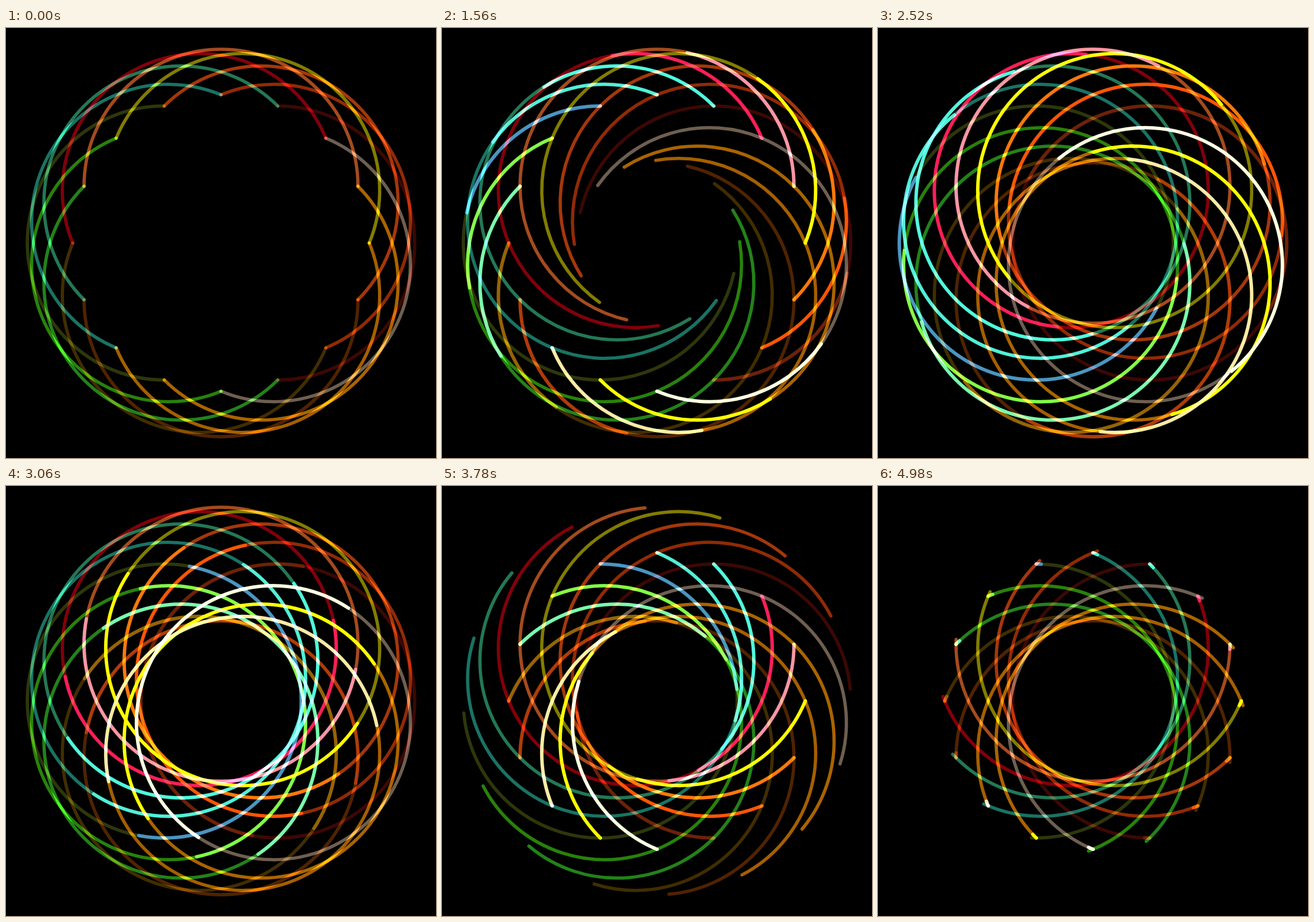
These frames come from a looping animation (728x728 px, 5040 ms). An HTML page with a canvas:

```html
<!DOCTYPE html>
<html lang="en">
<head>
<meta charset="utf-8">
<title>Woven rings</title>
<style>
html, body { margin: 0; height: 100%; background: #000; overflow: hidden; }
canvas { display: block; width: 100vw; height: 100vh; }
</style>
</head>
<body>
<canvas width="728" height="728"></canvas>
<script>
const ctx = document.querySelector('canvas').getContext('2d');
const LOOP = 5040, STEP = 60, MID = 364;
const RAD = Math.PI / 180, TURN = 22.5;

// Each ring passes through two corners of a 16-gon of radius 251.
const RADIUS = 251 * Math.cos(TURN * RAD);
const OFFSET = 251 * Math.sin(TURN * RAD);

// [base colour, light added by the travelling arc], clockwise from the top
const RINGS = [
  ['#197364', '#377d73'], ['#237855', '#2d8287'],
  ['#82000a', '#7d1e4b'], ['#a54b1e', '#5a4b82'],
  ['#827d00', '#7d8200'], ['#a5370a', '#5a4100'],
  ['#912a05', '#6e2b00'], ['#3c0804', '#321904'],
  ['#6e5f50', '#91a091'], ['#aa6400', '#559b00'],
  ['#a55f00', '#5a8ca0'], ['#502300', '#5f1908'],
  ['#412d00', '#553705'], ['#238219', '#557d91'],
  ['#28820a', '#5a7d3c'], ['#2d370a', '#1e5fb4']
];

const bezier = (a, b, s) => 3 * a * s * (1 - s) ** 2 + 3 * b * s * s * (1 - s) + s ** 3;

function ease(x) {
  let lo = 0, hi = 1;
  for (let i = 0; i < 30; i++) {
    const s = (lo + hi) / 2;
    if (bezier(.52, .47, s) < x) lo = s; else hi = s;
  }
  return bezier(0, .84, lo);
}

// Strokes a ring from one travelled angle to another, counterclockwise from its corner.
function stroke(corner, from, to, color, width) {
  const dir = (corner - 67.5) * RAD, start = corner + TURN;
  ctx.beginPath();
  ctx.arc(MID + OFFSET * Math.cos(dir), MID + OFFSET * Math.sin(dir), RADIUS,
    (start - from) * RAD, (start - to) * RAD, true);
  ctx.strokeStyle = color;
  ctx.lineWidth = width;
  ctx.stroke();
}

function draw(time) {
  const p = 540 * ease(time / LOOP) + .01;
  ctx.globalCompositeOperation = 'source-over';
  ctx.fillStyle = '#000';
  ctx.fillRect(0, 0, 728, 728);
  ctx.globalCompositeOperation = 'lighter';
  ctx.lineCap = 'round';
  RINGS.forEach(([base, glow], i) => {
    const corner = TURN * i - 90;
    stroke(corner, Math.max(0, p - 360), Math.min(360, p + 180), base, 5.5);
    stroke(corner, Math.max(0, p - 180), Math.min(360, p), glow, 6);
  });
}

const t0 = performance.now();
function tick() {
  const t = (performance.now() - t0) % LOOP;
  draw(Math.floor(t / STEP) * STEP);
  requestAnimationFrame(tick);
}
tick();
</script>
</body>
</html>
```
